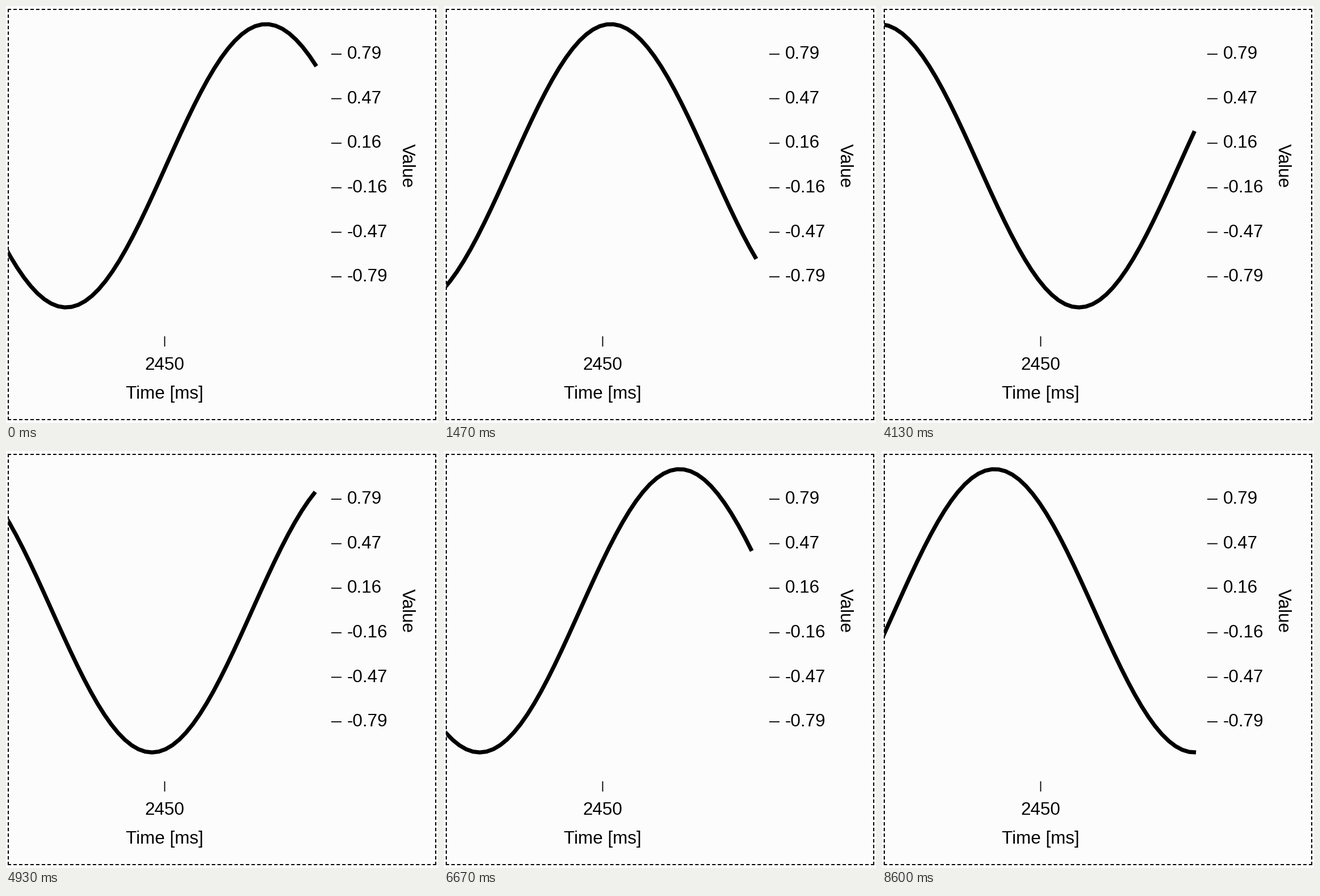
A matplotlib script for the animation above (8630 ms loop, 761 by 736 pixels).

```python
import numpy as np
import matplotlib.pyplot as plt
from matplotlib.animation import FuncAnimation
from matplotlib.patches import Rectangle

W, H, DPI = 761, 736, 100
LOOP, FRAMES = 8630, 432
TICK = LOOP / FRAMES
STEP = 100 / 3                   # the chart scrolls at 30 updates per second
PT = 72 / DPI                    # points per pixel

LEFT, RIGHT = 4, 553.5           # plot window
MID, AMP = 282, 250
SPEED = 0.1121                   # px per ms
PHASE = 0.852
SAMPLE, FIRST = 106.87, -60      # sampling period and offset, ms

fig = plt.figure(figsize=(W / DPI, H / DPI), dpi=DPI, facecolor="#fcfcfc")
ax = fig.add_axes([0, 0, 1, 1])
ax.axis("off")


def stroke(xs, ys, width, **kw):
    return ax.plot(xs, ys, color="black", lw=width * PT, snap=False,
                   solid_capstyle="butt", dash_capstyle="butt", **kw)[0]


def dashed(p, q, dash=6, gap=4):
    """Dashed side whose gaps are adjusted so it ends with a full dash."""
    size = np.hypot(q[0] - p[0], q[1] - p[1])
    count = round((size + gap) / (dash + gap))
    gap = (size - count * dash) / (count - 1)
    stroke([p[0], q[0]], [p[1], q[1]], 2, linestyle=(0, (dash / 2, gap / 2)))


def label(x, y, text, ha="center", rotation=0):
    ax.text(x, y, text, family="Liberation Sans", size=31.4 * PT, color="black",
            ha=ha, va="baseline", rotation=rotation, rotation_mode="anchor")


# border
for y in (6, 730):
    dashed((3, y), (758, y))
for x in (4, 757):
    dashed((x, 5), (x, 731))

# value axis
for i, value in enumerate((0.79, 0.47, 0.16, -0.16, -0.47, -0.79)):
    y = 85 + 78.6 * i
    stroke([573, 591], [y, y], 1.8)
    label(600.5, y + 8.3, f"{value:.2f}", ha="left")
label(698, 281.5, "Value", rotation=270)

# time axis
stroke([279.5, 279.5], [583, 601], 1.8)
label(279.5, 642.5, "2450")
label(279.5, 693, "Time [ms]")

curve = stroke([], [], 7.2, solid_joinstyle="miter")
window = Rectangle((LEFT - 0.5, 0), RIGHT - LEFT + 8, H, transform=ax.transData)
curve.set_clip_path(window)
ax.set(xlim=(0, W), ylim=(H, 0))


def update(n):
    # latest scroll update due before this frame ends (onsets round to 10 ms)
    due = np.floor(((n + 1) * TICK + 3.3) / STEP)
    now = STEP * min(due, LOOP // STEP)
    last = np.floor((now - FIRST) / SAMPLE)
    s = FIRST + SAMPLE * (last - np.arange(50))
    curve.set_data(RIGHT + (s - now) * SPEED,
                   MID - AMP * np.cos(s / 1000 + PHASE))
    return curve,


anim = FuncAnimation(fig, update, frames=FRAMES, interval=TICK,
                     repeat=True, repeat_delay=0, blit=False)
plt.show()
```
